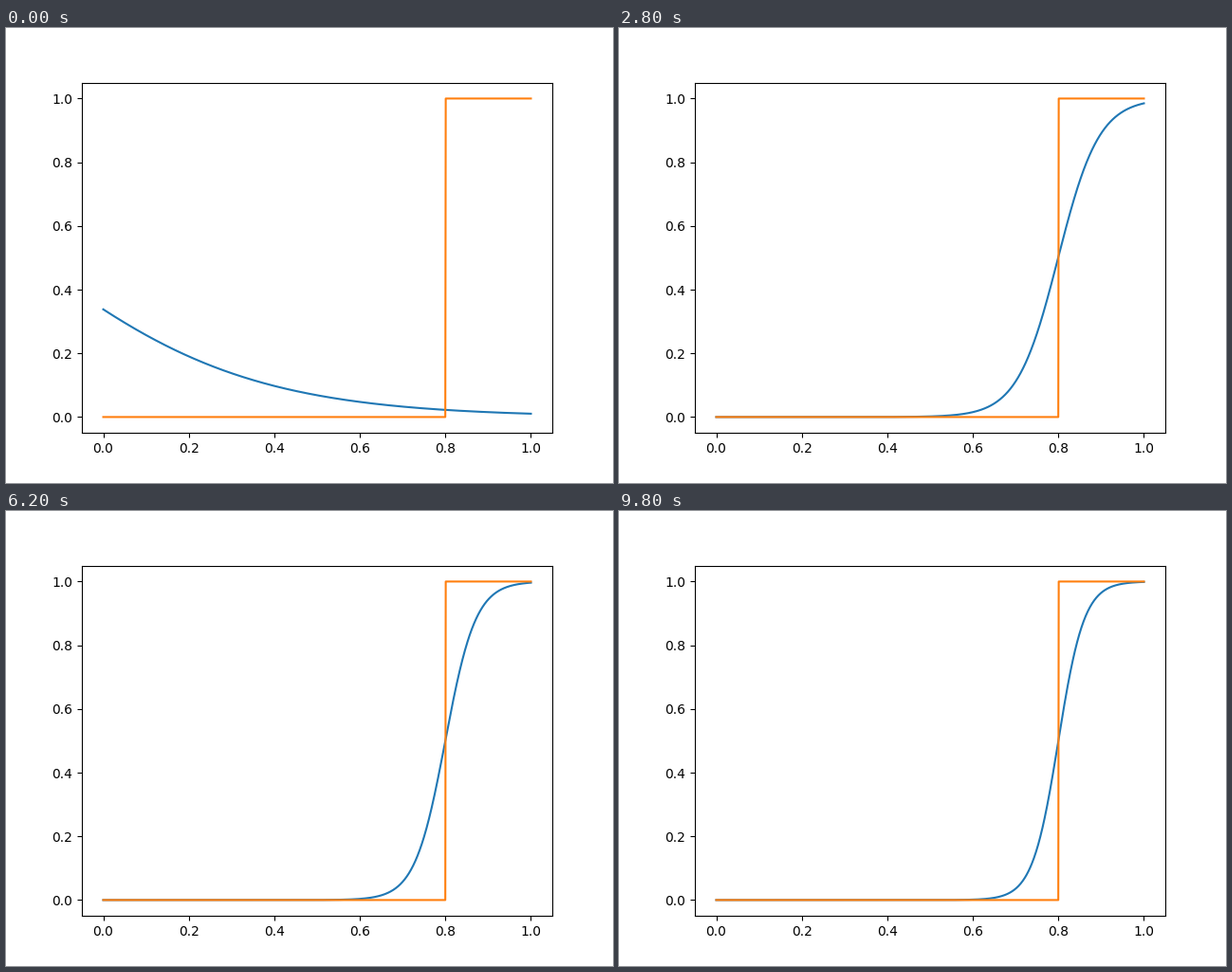
These frames come from a looping animation (640x480 px, 10 s). A matplotlib script:

```python
import numpy as np
import matplotlib.pyplot as plt
from matplotlib.animation import FuncAnimation

FRAMES, INTERVAL = 50, 200
START = (-3.88, -0.672)       # initial weight and bias
KEY_FRAMES = (0, 6, 49)
KEY_WEIGHTS = (14.35, 33.0)   # weights reached at the last two key frames
RATE = 3.0
MAX_STEPS = 80000

x = np.linspace(0, 1, 1000)
target = (x > 0.8).astype(float)


def predict(w, b):
    return 1 / (1 + np.exp(-(w * x + b)))


def train():
    """Fit a single neuron by gradient descent on the squared error."""
    w, b = START
    path = [START]
    while w < KEY_WEIGHTS[-1] and len(path) < MAX_STEPS:
        p = predict(w, b)
        slope = (p - target) * p * (1 - p)
        w -= RATE * slope.dot(x) / x.size
        b -= RATE * slope.sum() / x.size
        path.append((w, b))
    return np.array(path)


path = train()
steps = np.arange(len(path))
reached = int(np.argmax(path[:, 0] >= KEY_WEIGHTS[0]))
key_steps = (0, reached, len(path) - 1)


def params(frame):
    step = np.interp(frame, KEY_FRAMES, key_steps)
    return [np.interp(step, steps, column) for column in path.T]


fig, ax = plt.subplots(figsize=(6.4, 4.8), dpi=100)
curve, = ax.plot(x, predict(*START), color="#1f77b4", lw=1.5)
ax.plot(x, target, color="#ff7f0e", lw=1.5)
ax.set_xlim(-0.05, 1.05)
ax.set_ylim(-0.05, 1.05)


def update(frame):
    curve.set_ydata(predict(*params(frame)))
    return curve,


anim = FuncAnimation(fig, update, frames=FRAMES, interval=INTERVAL,
                     repeat=True, repeat_delay=0)
plt.show()
```
